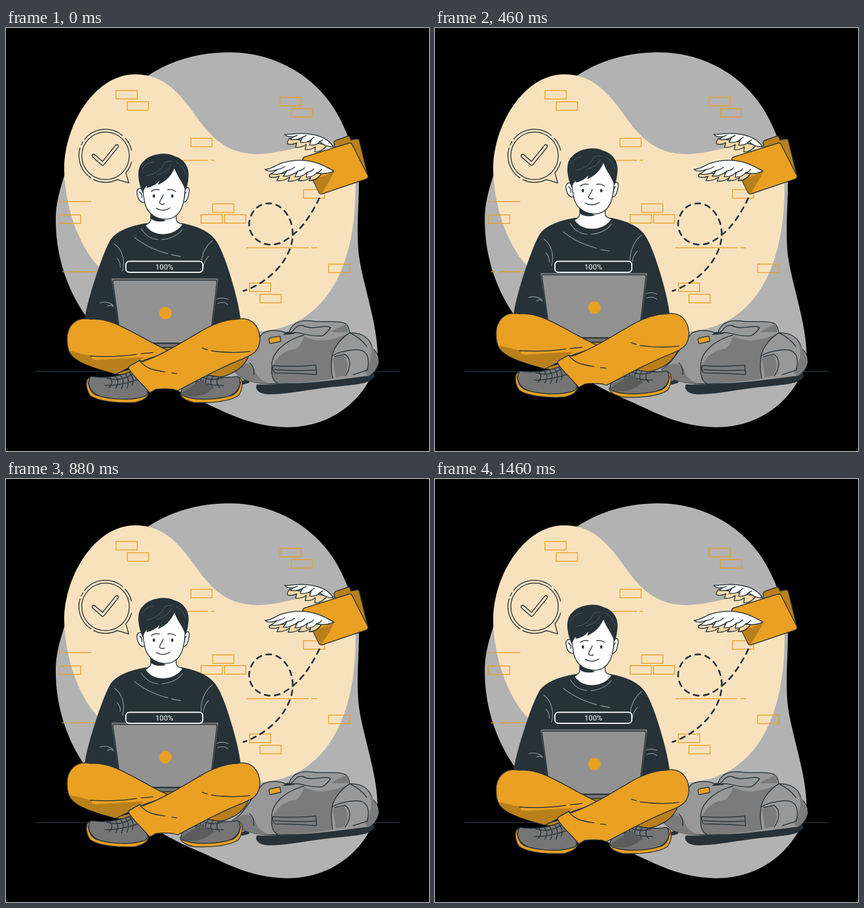
Animation, 748 px wide and 748 px high, one loop 1500 ms. Source, as an HTML page:

```html
<!DOCTYPE html>
<html lang="en">
<head>
<meta charset="utf-8">
<title>Upload complete</title>
<style>
html, body { margin: 0; height: 100%; overflow: hidden; background: #000; }
svg { display: block; width: 100vw; height: 100vh; fill: none; stroke-linecap: round; stroke-linejoin: round; }
.ink { stroke: #263238; stroke-width: 1.5; }
.line { stroke: #e9a023; stroke-width: 1.5; stroke-linecap: butt; stroke-linejoin: miter; }
.fold { stroke: #8c979c; stroke-width: 1.3; }
.orange { fill: #e9a023; }
.amber { fill: #b97f1b; }
.cream { fill: #f8e2be; }
.tan { fill: #f6d9a7; }
.white { fill: #fff; }
.dark { fill: #263238; }
.mid { fill: #757575; }
.light { fill: #929292; }
#backpack .mid { fill: #7b7b7b; }
#backpack .light { fill: #989898; }
text { font: 400 13px Roboto, "Open Sans", sans-serif; text-anchor: middle; fill: #fff; }
</style>
</head>
<body>
<svg viewBox="0 0 748 748">
  <g id="backdrop">
    <path fill="#b2b2b2" d="M250 85C290 58 340 43 395 43C475 43 542 84 578 139C604 179 624 238 624 274C624 315 620 350 623 392C627 442 655 512 657 575C655 625 600 707 495 706C430 704 390 680 345 660C270 630 190 576 143 512C105 459 88 398 88 340C88 306 97 282 104 258Z"/>
    <path class="cream" d="M228 82C282 81 311 121 339 160C369 202 398 223 446 223C487 222 513 209 551 207C590 206 613 231 618 275C620 395 582 533 440 537C320 548 230 500 165 423C125 382 103 307 103 249C103 172 157 82 228 82Z"/>
    <g id="bricks" class="line">
      <path d="M310 234H357M362 234H368M92 307H98M103 307H151M99 431H106M113 431H162M425 388.500H535M540 388.500H550"/>
    </g>
  </g>

  <g id="bubble" class="ink">
    <circle cx="176" cy="226" r="42"/>
    <path d="M139 197A47 47 0 0 1 206 190M211 195A47 47 0 0 1 222 216M133 207L136 201M131 212A47 47 0 0 0 150 265M155 268A47 47 0 0 0 197 268L217 274L212 256A47 47 0 0 0 222 237"/>
    <path stroke-width="7" d="M155 226L171 240L196 209"/>
    <path stroke="#f8e2be" stroke-width="4" d="M155 226L171 240L196 209"/>
  </g>

  <path stroke="#263238" stroke-width="3" stroke-dasharray="9 9" d="M554 301C540 330 524 353 507 366C490 380 478 384 464 383C440 379 429 362 430 344C433 322 448 310 466 310C490 311 508 338 507 366C506 405 470 448 420 465"/>

  <g id="folder" class="ink">
    <path class="amber" d="M581 209L580 203Q581 199 585 198L605 191Q608 191 610 198L621 196Q624 196 625 200L640 262L600 250Z"/>
    <path class="tan" d="M502 195Q496 201 498 205Q506 207 514 203L512 211Q522 212 531 206L529 215Q540 216 547 210L546 219Q558 220 568 207Z"/>
    <path class="white" d="M579 210C570 195 552 189 533 187C515 185 502 189 493 188Q498 194 509 192L503 197Q515 199 525 193L520 202Q532 204 540 197L537 207Q550 208 555 201Q566 211 579 210Z"/>
    <path class="orange" d="M525 233Q524 230 528 228L605 204Q610 202 612 206L640 261Q641 265 637 267L560 293Q555 295 553 290Z"/>
    <path class="amber" stroke="none" d="M541 264C555 267 568 260 580 253C576 266 566 279 558 293Q555 294 553 289Z"/>
    <path class="tan" d="M470 257Q464 260 466 263Q474 266 483 262L479 270Q492 271 502 263L499 271Q512 272 521 264L517 270Q530 271 539 264L536 270Q550 270 558 257Z"/>
    <path class="white" d="M580 253C568 247 557 239 540 236C520 232 502 234 487 239C476 243 469 250 458 250Q465 256 480 250Q472 256 469 258Q482 261 497 252Q492 260 490 262Q504 263 516 253Q512 261 511 263Q524 264 533 255Q531 262 531 264Q545 263 549 256Q566 260 580 253Z"/>
    <path d="M480 250Q488 249 493 245M497 252Q505 251 510 246M516 253Q524 252 528 247M533 255Q540 254 544 249M549 256Q555 255 558 250M509 192L515 190M525 193L531 190M540 197L545 193M555 201L560 198"/>
  </g>

  <path stroke="#263238" stroke-width="1.500" d="M52 607.500H696"/>

  <g id="backpack" class="ink">
    <path class="dark" d="M444 631C500 633 590 622 648 607L651 616C640 633 600 630 560 636C520 641 490 648 465 647C450 647 440 640 444 631ZM414 627L431 619L429 627L418 630Z"/>
    <path class="light" d="M400 604C425 590 438 554 455 539C470 532 485 534 500 541C503 524 518 515 540 518C560 522 590 515 602 524C606 528 607 534 608 539C630 538 644 549 648 566C655 572 660 580 659 592C655 606 647 613 639 616C590 622 540 630 490 629C460 630 440 628 420 621Z"/>
    <path class="mid" stroke="none" d="M400 604Q423 589 431 595C445 601 438 622 468 629Q440 629 420 621ZM470 601C479 580 492 570 514 567Q524 557 527 545C550 556 570 555 607 540C584 559 579 570 576 583Q573 605 577 620Q530 629 480 628Q468 622 470 601ZM603 524Q582 531 575 538L605 538ZM597 579C605 585 607 600 598 615L583 618L578 583ZM641 553Q654 580 634 607L640 616Q655 608 659 590Q651 566 641 553Z"/>
    <path d="M470 600C468 574 494 552 527 543M480 628Q468 622 470 599M500 541C515 533 537 548 560 544Q569 538 574 530C563 523 543 536 525 526Q515 524 508 535L500 541M608 539C589 550 577 570 576 584Q574 605 578 619M577 580Q590 571 618 569C638 568 644 581 639 605L614 613M581 581L599 577C610 583 611 600 600 615M472 597Q510 600 548 596L549 613Q510 610 476 610Q470 605 472 597M475 604Q510 607 548 605M608 539Q627 548 638 563M431 592Q440 600 438 613"/>
    <path class="dark" d="M491 542L497 538L510 540Z"/>
    <path class="orange" d="M467 548L483 545Q485 545 485 547L486 554L468 558Q466 558 466 556L465 550Z"/>
  </g>

  <g id="person">
    <path class="ink dark" d="M247 346C218 351 197 359 186 374C172 397 145 479 140 514L200 580H360L414 515C410 479 388 405 373 380C362 361 341 352 312 346Z"/>
    <path class="white ink" d="M256 327V340Q253 346 246 349C260 372 299 370 313 347Q301 345 301 338V326Z"/>
    <path class="dark" d="M256 327L283 341Q265 345 256 337Z"/>
    <path class="white ink" d="M243 286C235 280 230 286 232 294C234 305 240 311 246 307ZM316 286C322 278 326 283 323 294C321 306 316 310 312 307Z"/>
    <path class="white ink" d="M241 278C244 298 243 318 257 329C267 338 286 342 299 333C313 324 316 302 317 280L298 243L250 262Z"/>
    <path class="dark ink" d="M242 291C233 269 231 246 244 236C255 224 281 219 297 227C314 232 323 245 322 262Q321 278 317 286C315 273 303 264 298 246C292 261 284 269 270 276L274 266C265 277 258 280 249 282L252 276Q243 282 242 291Z"/>
    <path stroke="#56636a" d="M240 251Q246 238 260 237M249 261Q270 259 281 238Q287 234 293 236M267 260Q286 255 292 242M301 237Q315 244 318 259"/>
    <path class="ink" d="M257 289Q263 284 271 286M286 286Q293 284 300 289M278 295C277 301 270 306 272 310Q275 313 280 311M266 319Q278 326 290 318M236 290Q241 292 240 300M319 290Q315 293 316 300"/>
    <g class="dark"><ellipse cx="261.500" cy="297" rx="2" ry="3"/><ellipse cx="294" cy="297" rx="2" ry="3"/></g>
    <path class="fold" d="M239 355Q251 373 268 374M276 374C293 373 306 365 312 356M227 370C246 386 268 394 286 399M293 401L309 404M192 382C206 392 211 411 206 430M196 407Q203 414 202 423M365 376C352 386 344 404 345 423M358 404Q350 412 349 423M166 486Q178 482 189 490M179 492Q187 488 190 493M371 480Q383 475 393 480M374 487Q386 483 392 489"/>

    <g class="ink">
      <path class="mid" d="M186 444Q186 442 189 442H374Q377 442 376 445L361 563H204Z"/>
      <path class="light" d="M189 448Q189 446 192 446H370Q373 446 373 449L360 557H204Z"/>
      <path class="mid" d="M203 558H350V565H203Z"/>
    </g>
    <circle class="orange" cx="282" cy="504" r="11"/>

    <path class="amber ink" d="M245 565H320L270 590L190 611L220 616L245 589ZM330 625L380 585L430 577C424 597 407 609 385 616Z"/>
    <path class="orange ink" d="M149 515C124 510 108 526 108 550C108 574 115 583 137 592Q166 604 194 612L245 587L291 572C260 560 224 535 191 522Q168 513 149 515Z"/>
    <path class="amber" d="M113 571C133 575 143 579 153 580Q148 586 160 587L244 582L235 590L193 611C160 602 119 592 113 571Z"/>
    <path class="ink" d="M149 580Q193 583 231 577M239 576L260 574"/>

    <g id="shoe" class="ink">
      <path class="orange" d="M147 618C139 624 142 640 149 650C165 661 202 664 229 662Q250 657 252 646Z"/>
      <path class="mid" d="M150 616C142 626 147 643 159 649C183 657 221 660 246 651Q253 647 249 639C240 625 228 617 223 607C198 617 174 620 150 616Z"/>
      <path d="M178 619Q199 626 223 613M175 632Q200 633 233 622M183 617Q192 626 182 636M193 616Q202 625 194 637M202 614Q211 624 204 638M211 612Q220 622 214 637M219 610Q228 620 223 632M145 626Q149 645 164 650"/>
    </g>
    <use href="#shoe" transform="matrix(-1 0 0 1 560 0)"/>
    <path fill="#5c5c5c" d="M312 644L349 621Q355 634 368 634C356 650 335 654 319 651Q312 650 312 644Z"/>

    <path class="orange ink" d="M409 515C434 510 449 527 449 551C448 570 438 577 421 584C380 600 340 622 304 641Q300 641 297 639Q280 637 265 639L254 645C244 631 225 617 217 602Q216 599 220 597L236 588L242 590C276 578 309 557 340 539Q377 516 409 515Z"/>
    <path class="ink" d="M236 588C249 604 263 605 281 608M293 610L302 611M347 566L356 569M363 571Q398 576 431 572"/>
  </g>

  <rect x="212" y="412.500" width="136" height="19.500" rx="6" class="dark" stroke="#fff" stroke-width="2"/>
  <text x="280" y="427">100%</text>
</svg>
<script>
const bricks = document.getElementById("bricks");
const person = document.getElementById("person");
const corners = [
  [194.5, 110.5], [214.5, 130.5], [327, 195], [484.5, 122.5], [504.5, 142.5],
  [94.5, 330.5], [365.5, 311], [345, 330], [386.5, 330], [526, 286],
  [570.5, 417.5], [430.5, 451], [449, 471]
];
for (const [x, y] of corners) {
  bricks.insertAdjacentHTML("beforeend", `<rect x="${x}" y="${y}" width="37.500" height="15"/>`);
}

const LOOP = 1500, STEPS = 36, LIFT = 15;
const start = performance.now();

// Linear rise and fall, held on 24 steps per second.
function draw() {
  const time = (performance.now() - start) % LOOP;
  const step = Math.floor(time / LOOP * STEPS);
  const middle = (STEPS - 1) / 2;
  const rise = LIFT * (1 - Math.abs(step - middle) / middle);
  person.setAttribute("transform", `translate(0 ${-rise})`);
  requestAnimationFrame(draw);
}
draw();
</script>
</body>
</html>
```
